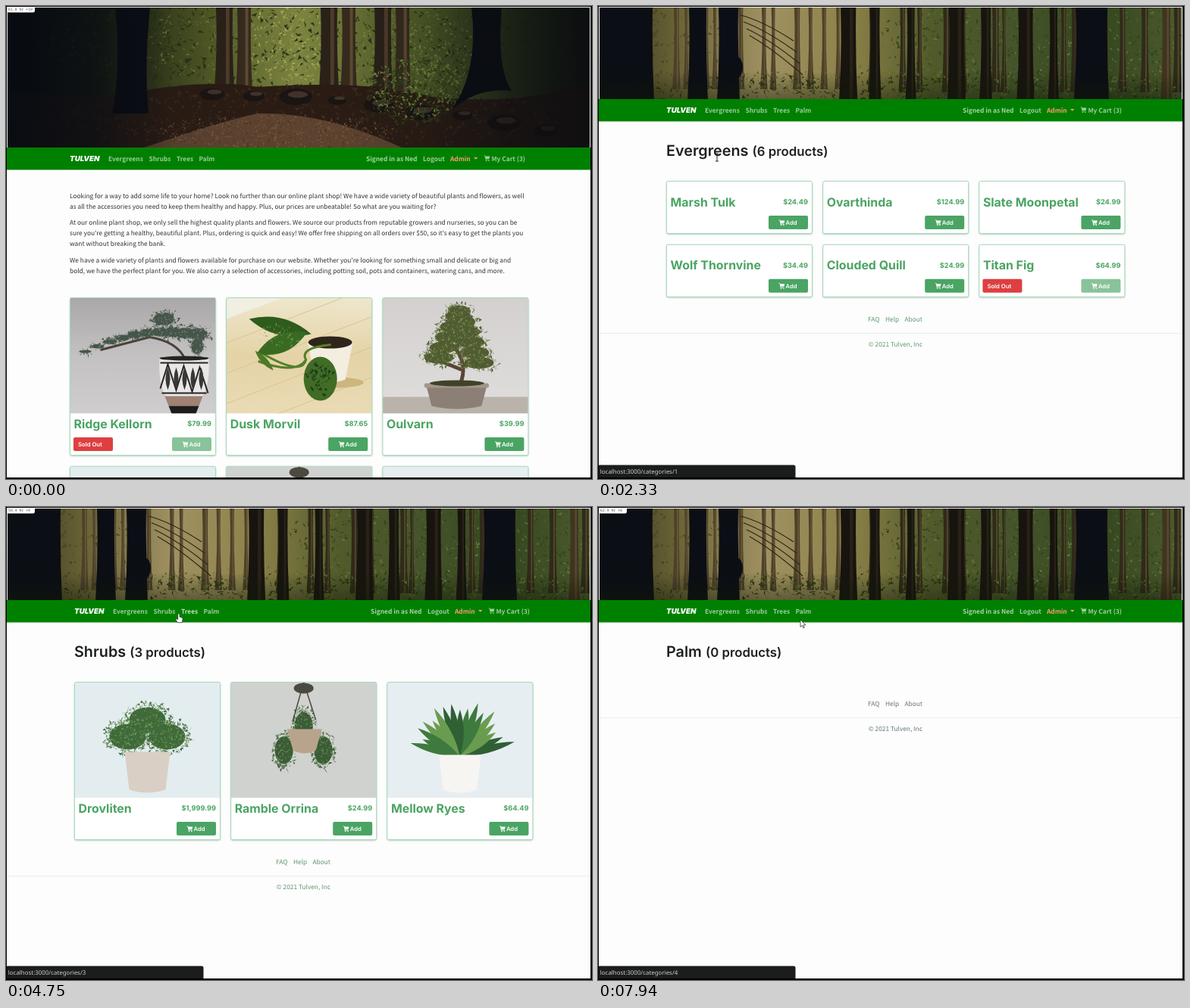
An HTML page for the animation above (8000 ms loop, 773 by 625 pixels).

```html
<!DOCTYPE html>
<html lang="en">
<meta charset="utf-8">
<title>Plant shop</title>
<style>
  html, body { margin: 0; height: 100%; overflow: hidden; background: #000; }
  #stage { display: block; width: 100vw; height: 100vh; }
  text { font: 8.35px "Noto Sans CJK JP", "Noto Sans CJK SC", "Noto Sans CJK", "Noto Sans", sans-serif; text-rendering: geometricPrecision; }
  .nav { font-weight: 700; }
  .geo { font-family: Inter, sans-serif; font-weight: 700; }
  .brand { font-size: 9.7px; font-weight: 900; font-style: italic; }
  .title { font-size: 19.8px; font-weight: 600; }
  .title tspan { font-size: 16.8px; }
  .name { font-size: 15.9px; }
  .price { font-size: 9.2px; text-anchor: end; }
  .btn { font-size: 7.7px; font-weight: 600; }
  .mid { text-anchor: middle; }
  .url { font: 7.9px "Noto Sans", "Open Sans", sans-serif; }
  .rate { font: 4.8px "DejaVu Sans Mono", monospace; }
  .card { filter: drop-shadow(0 1.2px 1px #3b8a5a90); }
</style>
<svg id="stage" viewBox="0 0 773 625">
  <clipPath id="view"><rect x="1" y="1" width="770" height="622"/></clipPath>
  <defs id="defs"></defs>
  <g clip-path="url(#view)">
    <g id="page"></g>
    <g id="status">
      <rect id="bar" y="606.5" height="20" rx="2.5" fill="#1b1c1c"/>
      <text id="url" class="url" x="2.8" y="617.5" fill="#d0d0d0"></text>
    </g>
    <path id="cursor" stroke="#222"/>
    <g id="badge">
      <rect x="1" y="0" width="37" height="8.5" rx="2.5" fill="#fff"/>
      <text id="rate" class="rate" x="3" y="6" fill="#555"></text>
    </g>
  </g>
</svg>
<script>
const $ = id => document.getElementById(id);
const clamp = v => Math.max(0, Math.min(1, v));
const times = (n, fn) => Array.from({length: n}, (_, i) => fn(i, n > 1 ? i / (n - 1) : 0)).join('');
const r1 = n => n.toFixed(1);
const {sin, cos, PI} = Math;
let seed = 7;
const rnd = (lo = 0, hi = 1) => lo + (hi - lo) * (seed = seed * 16807 % 2147483647) / 2147483647;

// ---- shape helpers
const rect = (x, y, w, h, fill, more = '') => `<rect x="${x}" y="${y}" width="${w}" height="${h}" fill="${fill}" ${more}/>`;
const oval = (x, y, rx, ry, fill) => `<ellipse cx="${x}" cy="${y}" rx="${rx}" ry="${ry}" fill="${fill}"/>`;
const path = (d, fill) => `<path d="${d}" fill="${fill}"/>`;
const line = (d, color, w, more = '') => `<path d="${d}" fill="none" stroke="${color}" stroke-width="${w}" ${more}/>`;
const text = (x, y, str, cls, fill) => `<text x="${x}" y="${y}" class="${cls}" fill="${fill}">${str}</text>`;
const grad = (id, across, ...stops) => `<linearGradient id="${id}" x2="${across}" y2="${1 - across}">` +
  stops.map((c, i) => `<stop offset="${i / (stops.length - 1)}" stop-color="${c}"/>`).join('') + '</linearGradient>';
const leaf = (x1, y1, x2, y2, w, fill) => {
  const len = Math.hypot(x2 - x1, y2 - y1), nx = (y1 - y2) / len * w, ny = (x2 - x1) / len * w;
  const mx = (x1 + x2) / 2, my = (y1 + y2) / 2;
  return path(`M${r1(x1)} ${r1(y1)}Q${r1(mx + nx)} ${r1(my + ny)} ${r1(x2)} ${r1(y2)}Q${r1(mx - nx)} ${r1(my - ny)} ${r1(x1)} ${r1(y1)}`, fill);
};
const fan = (x, y, n, r, spread, w, ...fills) => times(n, i => {
  const a = spread * (2 * (i * 3 % n) / (n - 1) - 1) * PI / 180, q = r * rnd(.75, 1.05);
  return leaf(x, y, x + q * sin(a), y - q * cos(a), w, fills[i % fills.length]);
});
const spray = (n, x, y, rx, ry, s, fill) => {
  const jit = () => r1(rnd(-s, s));
  return path(times(Math.round(n), () => {
    const a = rnd(0, 2 * PI), q = Math.sqrt(rnd());
    return `M${r1(x + rx * q * cos(a))} ${r1(y + ry * q * sin(a))}l${jit()} ${jit()}l${jit()} ${jit()}z`;
  }), fill);
};
const bush = (x, y, rx, ry, dark, light) =>
  oval(r1(x), r1(y), rx * .75, ry * .7, dark) + spray(rx * ry * .4, x, y, rx, ry, 4, dark) + spray(rx * ry * .25, x, y, rx, ry, 2.5, light);
const pot = (x, top, w, base, bottom, fill) => path(`M${x - w} ${top}H${x + w}L${x + base} ${bottom}Q${x} ${bottom + 8} ${x - base} ${bottom}Z`, fill);

// ---- header pictures
const night = '#0b0e14';
const trunk = (x, w, h, fill, lit) => path(`M${r1(x)} 0Q${r1(x + 2)} ${h / 2} ${r1(x - 2)} ${h}h${r1(w + 4)}Q${r1(x + w - 1)} ${h / 2} ${r1(x + w)} 0Z`, fill) +
  (lit ? line(`M${r1(x + w * .7)} 0V${h}`, lit, r1(w * .22)) : '');
const grove = (n, from, to, w, h, fill, lit) =>
  times(n, (i, k) => trunk(from + (to - from) * k + rnd(-9, 9), w * rnd(.6, 1.3), h, fill, lit));

const woods = rect(0, 0, 768, 121, 'url(#haze)') +
  spray(900, 600, 40, 230, 85, 5, '#34461d') + spray(500, 610, 50, 220, 75, 4, '#677737') + spray(200, 90, 60, 85, 70, 5, '#494722') +
  grove(12, 90, 310, 6, 108, '#4d412a', '#6b5a3a') + grove(14, 360, 750, 7, 112, '#2f2a1a', '#54482c') +
  times(4, i => line(`M${186 + i * 4} ${10 + i * 9}q30 ${8 + i * 3} 70 ${34 + i * 6}`, '#2b2516', 1.2)) +
  spray(500, 430, 108, 370, 24, 5, '#28370f') + spray(420, 450, 102, 340, 22, 4, '#5c6d2b') + spray(140, 320, 100, 110, 22, 3, '#7d7c3d') +
  grove(7, 318, 590, 16, 123, '#17140f', '#282116') + trunk(742, 11, 123, '#41351f', '#5a4a2d') +
  trunk(0, 70, 123, night) + trunk(118, 23, 123, night) + trunk(157, 26, 123, night) + oval(181, 79, 8, 14, night) + trunk(628, 42, 123, night) +
  rect(0, 85, 768, 36, 'url(#dusk)');

const glade = rect(0, 0, 768, 185, 'url(#glow)') +
  spray(900, 384, 50, 340, 65, 6, '#2a3417') + spray(420, 400, 50, 240, 60, 4, '#6a7534') +
  spray(260, 375, 50, 60, 55, 4, '#a3a556') + spray(300, 540, 75, 90, 65, 4, '#74833a') +
  [275, 413, 484].map(x => trunk(x, 22, 108, '#2a2118', '#4d3c29') + trunk(x + 28, 18, 112, '#352a1d', '#5d4932')).join('') +
  path('M0 110Q120 125 190 108Q280 95 330 105Q480 95 560 118Q680 130 768 100V185H0Z', '#2a1c14') +
  spray(700, 400, 145, 330, 40, 5, '#3d2a1d') + path('M180 185Q290 148 330 140Q420 138 520 185Z', '#5c422f') +
  spray(500, 355, 165, 160, 22, 3, '#7b5b42') + spray(400, 350, 166, 170, 22, 3, '#4a3425') +
  times(9, (i, k) => {
    const x = 270 + 440 * k, y = 115 + 50 * k * k + rnd(-4, 4), w = rnd(11, 22);
    return oval(r1(x), r1(y), r1(w), r1(w * .5), '#1a1412') + oval(r1(x + 3), r1(y - 3), r1(w * .6), r1(w * .2), '#40322a');
  }) +
  spray(400, 535, 110, 60, 45, 5, '#2f421a') + spray(300, 540, 105, 60, 42, 4, '#75883a') +
  path('M142 0H188Q180 80 186 140H138Q150 80 142 0Z', night) + path('M612 0H652Q645 80 665 110Q620 105 585 136Q622 85 612 0Z', night) +
  rect(0, 0, 768, 185, 'url(#edges)');

// ---- plant pictures, 192 x 153
const back = fill => rect(0, 0, 192, 153, fill);
const photos = [
  // leaning juniper in a patterned pot
  back('url(#grey)') + line('M152 82Q142 58 105 52L40 69', '#4a4138', 3) +
    times(10, (i, k) => bush(20 + 148 * k, 71 - 23 * k - 12 * sin(PI * k), 11 + 6 * k, 3 + 8 * k, '#455549', '#77877b')) +
    bush(124, 28, 18, 12, '#455549', '#77877b') + bush(168, 64, 11, 14, '#455549', '#77877b') +
    path('M118 80H183Q185 115 174 131H127Q116 115 118 80Z', '#e9e7e5') + oval(150.5, 80, 32.5, 3, '#262423') +
    line('M119 86H182M121 126H180M119 120' + 'l10-32l11 34'.repeat(3), '#262423', 2) +
    times(5, i => leaf(129 + i * 11, 92, 129 + i * 11, 122, 6, '#3a3735')) +
    path('M125 130H175L170 143H130Z', '#a08174') + path('M130 143H170L166 153H134Z', '#1d1b1b'),
  // trailing vine
  back('url(#cream)') + path('M0 0H75L0 28Z', '#f1eee2') + times(4, i => line(`M0 ${60 + i * 40}l192-75`, '#d8c493', 1)) +
    oval(145, 112, 36, 7, '#cdb57f') + pot(137, 58, 30, 20, 108, '#f4eee0') + oval(137, 59, 29, 8, '#30251a') +
    line('M138 62Q96 66 105 82Q100 104 48 74M105 82Q92 102 42 84', '#55802a', 3) +
    leaf(30, 28, 112, 48, 22, '#2e5c1d') + leaf(40, 74, 106, 46, 24, '#386a22') + spray(60, 72, 50, 28, 14, 3, '#7da04f') +
    leaf(38, 70, 62, 96, 8, '#4c7a28') + oval(124, 107, 22, 29, '#416c25') + spray(60, 124, 107, 16, 22, 5, '#18381a'),
  // bonsai
  back('url(#pale)') + rect(0, 131, 192, 22, '#b9b3ac') + line('M102 115Q112 90 98 70L102 30M104 95L72 82M104 92L130 80', '#5a4636', 5) +
    times(11, (i, k) => bush(101 + (i % 2 ? -30 : 26) * k, 18 + 68 * k, 20 + 6 * k, 11, '#4f5c31', '#86924f')) +
    pot(97.5, 116, 40, 33, 143, '#8c7f76') + rect(55, 113, 85, 6, '#a3968c', 'rx="2"') + oval(98, 113, 36, 4, '#3f4228'),
  // snake plant
  back('#cab6a2') + rect(0, 0, 62, 153, 'url(#veil)') +
    times(9, (i, k) => [9, 3].map((w, j) =>
      leaf(116 + 30 * k, 153, 80 + 82 * k, 8 + 65 * k * k + i % 2 * 30, w, j ? '#8a8459' : '#45432c')).join('')),
  // broad leaves on a stem
  back('#d1bda8') + times(5, i => line(`M${20 + i * 40} 0q${rnd(-8, 8)} 80 0 153`, '#c5ae97', 1)) + line('M95 140Q98 80 90 22', '#466032', 2.5) +
    times(13, i => {
      const side = i % 2 ? 1 : -1, y = 126 - 8 * i, far = side * (62 - 3.4 * i), tip = y - 18 + rnd(-6, 16);
      return line(`M94 ${y}L${94 + far * .5} ${r1(y - 6)}`, '#466032', 1.5) +
        leaf(94 + far * .35, y - 4, 94 + far, tip, 15, '#22422a') + leaf(94 + far * .5, y - 5, 94 + far * .9, tip, 4, '#42683e');
    }) + pot(100, 136, 34, 30, 153, '#b89a78') + line('M68 142H132M70 149H130', '#7c634b', 2, 'stroke-dasharray="4 2"'),
  // succulent in a turquoise pot
  back('#f1f1f2') + rect(0, 88, 192, 65, '#e4e5e6') + oval(105, 143, 45, 5, '#d2d5d5') +
    fan(95, 78, 17, 62, 68, 9, '#333b30', '#566450', '#454a3b') + fan(95, 78, 7, 40, 50, 8, '#64745a', '#3a4636') +
    pot(93, 74, 40, 31, 139, '#b5ece4') + rect(53, 73, 80, 7, '#c8f3ed'),
  // cactus
  back('url(#smoke)') + rect(130, 100, 62, 53, '#86705f') +
    [['#6f7969', 13], ['#9ea897', 8]].map(([c, w]) => line('M98 125Q92 70 95 14M99 95Q106 50 144 22M100 92Q118 72 136 66M95 82Q84 76 79 52', c, w, 'stroke-linecap="round"')).join('') +
    spray(110, 105, 62, 30, 50, 2.5, '#c3cabc') + path('M47 153Q46 122 60 119H114Q128 124 128 153Z', '#c9c7c3') + oval(87, 120, 28, 4, '#8e8a83'),
  // upright succulent
  back('#e3e3e2') + rect(0, 0, 192, 25, '#c6c6ca') + rect(0, 102, 192, 51, '#a4775a') +
    times(9, i => line(`M${76 + i * 5} 102L${i * 40 - 64} 153`, '#8a644d', 1)) +
    fan(96, 96, 11, 60, 42, 9, '#4a5650', '#738077', '#3c4842') + rect(73, 91, 47, 48, '#f6f6f5') + rect(113, 91, 7, 48, '#e0dfdd'),
  // fern
  back('#f0f0f1') + rect(0, 127, 192, 26, '#8b6c5b') +
    times(15, (i, k) => {
      const a = PI * (1.12 * k - .06), reach = rnd(65, 98);
      const d = `M100 104Q${r1(99 + 50 * cos(a))} ${r1(48 - 32 * sin(a))} ${r1(99 + reach * cos(a))} ${r1(92 - reach * .85 * sin(a))}`;
      return line(d, ['#3c8a2c', '#55a93a', '#2f7326'][i % 3], 8, 'stroke-dasharray="3 1.5"') + line(d, '#4a9a35', 3);
    }) + pot(100, 104, 26, 21, 148, '#efb2a6'),
  // round shrub, hanging basket, agave
  back('#e3edf0') + times(3, i => bush(70 + 26 * i, i % 2 ? 50 : 72, 32, 24, '#3f6a3a', '#7fa05c')) + pot(96, 92, 30, 24, 142, '#d9cfc4'),
  back('#d0d2cf') + line('M96 0L82 50M96 0L112 50', '#4c4a40', 1.5) + oval(96, 8, 13, 7, '#4c4a40') +
    times(3, i => bush(70 + 26 * i, i % 2 ? 58 : 90, 16, 26, '#3b5c37', '#76955a')) + pot(97, 62, 23, 15, 90, '#b8a48c'),
  back('#e6eef2') + fan(96, 98, 17, 72, 75, 10, '#3e7a3d', '#6a9c50', '#2f6034') + pot(96, 96, 28, 22, 142, '#f7f5f1')
];

$('defs').innerHTML =
  grad('haze', 1, '#33331a', '#6d6638', '#a09162', '#8d8149', '#505a2a', '#45542a', '#35461f', '#4c5a2e') +
  grad('glow', 1, '#10140f', '#1d2414', '#4c5423', '#7d8440', '#55602a', '#3a481e', '#151b10') +
  grad('dusk', 0, '#10180800', '#10180870') +
  grad('edges', 1, '#070b12f0', '#070b12b0', '#070b1210', '#070b1200', '#070b1200', '#070b1220', '#0a0c1090', '#0a0c10d0') +
  grad('grey', 0, '#a9a7a7', '#c3c1c1', '#cfcdcd') + grad('cream', 0, '#efe6cc', '#e4d3a6', '#eadbb5') + grad('veil', 1, '#f4f1ed', '#f0ece7', '#ddd3c8') +
  grad('pale', 0, '#d3d0cf', '#e0dedc') + grad('smoke', 1, '#666764', '#92938f', '#7f7c77') +
  photos.map((p, i) => `<symbol id="p${i}" viewBox="0 0 192 153">${p}</symbol>`).join('') +
  `<symbol id="woods" viewBox="0 0 768 121">${woods}</symbol><symbol id="glade" viewBox="0 0 768 185">${glade}</symbol>`;

// ---- shop content
const plants = [ // name, price, sold out
  ['Ridge Kellorn', '$79.99', 1], ['Dusk Morvil', '$87.65'], ['Oulvarn', '$39.99'],
  ['Marsh Tulk', '$24.49'], ['Ovarthinda', '$124.99'], ['Slate Moonpetal', '$24.99'],
  ['Wolf Thornvine', '$34.49'], ['Clouded Quill', '$24.99'], ['Titan Fig', '$64.99', 1],
  ['Drovliten', '$1,999.99'], ['Ramble Orrina', '$24.99'], ['Mellow Ryes', '$64.49']
];
const pages = [ // badge: when the rate badge is fully visible
  {at: 0, ids: [0, 1, 2, 9, 10, 11], badge: 0, rate: '61.8 Hz +10'},
  {at: 2120, title: 'Evergreens', ids: [3, 4, 5, 6, 7, 8], badge: 2870, rate: '50.2 Hz +12', foot: '#5b9a6c'},
  {at: 3780, title: 'Shrubs', ids: [9, 10, 11], badge: 4540, rate: '58.4 Hz +9', foot: '#5f9470'},
  {at: 5090, title: 'Trees', ids: [0, 1, 2], badge: 5840, rate: '90.0 Hz +11', foot: '#6c7a74'},
  {at: 7010, title: 'Palm', ids: [], badge: 7530, rate: '62.9 Hz +8', foot: '#62747e'}
];
const intro = [
  ['Looking for a way to add some life to your home? Look no further than our online plant shop! We have a wide variety of beautiful plants and flowers, as well',
    'as all the accessories you need to keep them healthy and happy. Plus, our prices are unbeatable! So what are you waiting for?'],
  ['At our online plant shop, we only sell the highest quality plants and flowers. We source our products from reputable growers and nurseries, so you can be',
    "sure you're getting a healthy, beautiful plant. Plus, ordering is quick and easy! We offer free shipping on all orders over $50, so it's easy to get the plants you",
    'want without breaking the bank.'],
  ["We have a wide variety of plants and flowers available for purchase on our website. Whether you're looking for something small and delicate or big and",
    'bold, we have the perfect plant for you. We also carry a selection of accessories, including potting soil, pots and containers, watering cans, and more.']
];
const links = [[51, 'Evergreens'], [104.5, 'Shrubs'], [141, 'Trees'], [170.5, 'Palm']];

const cart = (x, y, fill) => `<g transform="translate(${x} ${y})">` +
  path('M0 0H1.7L2 1H7.8L7 4.4H2.8L3 5.2H7V6H2.2L1.1 .8H0Z', fill) + oval(3, 7, .8, .8, fill) + oval(6.4, 7, .8, .8, fill) + '</g>';

const button = (x, y, label, dx, fill) => rect(x, y, 52, 18, fill, 'rx="2"') + text(x + dx, y + 12, label, 'geo btn', '#fff');

const card = (x, y, h, id, loaded) => {
  const [name, price, sold] = plants[id], end = y + (loaded ? 208 : 69), top = end - 23.5;
  return rect(x, y, 192, h, '#fff', 'rx="2" class="card"') +
    (loaded ? `<use href="#p${id}" x="${x}" y="${y}" width="192" height="153"/>` : '') +
    rect(x, y, 192, h, 'none', 'rx="2" stroke="#a8d9ba"') +
    text(x + 5, end - 36, name, 'geo name', '#4aa463') + text(x + 186.5, end - 38.2, price, 'geo price', '#4aa463') +
    (sold ? button(x + 4.5, top, 'Sold Out', 6, '#de3f40') : '') +
    `<g opacity="${sold ? .65 : 1}">` + button(x + 134.5, top, 'Add', 22.5, '#4aa463') + cart(x + 148, top + 5.4, '#fff') + '</g>';
};

function introText(x) {
  let y = 246, out = '';
  for (const lines of intro) {
    y -= 6.5;
    for (const s of lines) out += text(x, y += 14, s, '', '#333');
    y += 14.3;
  }
  return out;
}

function drawPage(page, loaded, hover) {
  const home = !page.title, hero = home ? 187 : 123, rows = [];
  let y = home ? 385.5 : 231.5;
  for (let i = 0; i < page.ids.length; i += 3) {
    const h = loaded > i ? 208 : 69;
    rows.push({i, y, h});
    y += h + 14.8;
  }
  const rule = Math.max(y - 15, 230) + 48, x = rule > 582 ? 84 : 90; // a scrollbar narrows the page
  const base = hero + 17.6, dim = '#ffffff9c', pink = '#f79b78';
  let out = rect(0, 0, 773, 625, '#fdfdfd') +
    `<use href="#${home ? 'glade' : 'woods'}" x="2" y="2" width="768" height="${hero - 2}"/>` + rect(0, hero, 773, 29.5, '#008000') +
    text(x, base, 'TULVEN', 'geo brand', '#fff') +
    links.map(([dx, s], i) => text(x + dx, base, s, 'nav', i === hover ? '#ffffffbf' : dim)).join('') +
    text(x + 391, base, 'Signed in as Ned', 'nav', '#ffffffa8') + text(x + 466, base, 'Logout', 'nav', dim) +
    text(x + 502, base, 'Admin', 'nav', pink) + path(`M${x + 533} ${hero + 13}h5.4l-2.7 2.8z`, pink) +
    cart(x + 546.5, hero + 10.5, dim) + text(x + 556.5, base, 'My Cart (3)', 'nav', dim);
  for (const {i, y, h} of rows)
    for (let k = i; k < i + 3; k++) out += card(+r1(x + .5 + (k - i) * 206.2), y, h, page.ids[k], k < loaded);
  if (home) return out + introText(x);
  return out + text(x, 198, `${page.title} <tspan>(${page.ids.length} products)</tspan>`, 'geo title', '#1c211c') +
    rect(0, rule, 773, 1, '#ececec') +
    [[266, 'FAQ'], [289, 'Help'], [314.5, 'About']].map(([dx, s]) => text(x + dx, rule - 15.5, s, '', page.foot)).join('') +
    text(x + 302.3, rule + 18, '© 2021 Tulven, Inc', 'mid', page.foot);
}

// ---- pointer and status bar
const glides = [ // start, end, x, y
  [0, 1, 724, 624], [260, 950, 136, 181], [950, 1200, 157, 200], [2940, 3270, 202, 145], [3450, 3710, 199, 140],
  [4610, 4820, 238, 141], [5150, 5560, 288, 184], [6180, 6800, 270, 140], [7730, 7930, 267, 149]
];
const hints = [[1100, 3010], [3600, 4720], [4720, 6040], [6740, 8140]];
const shapes = {
  arrow: 'M0 0V9.5L2.3 7.4 3.9 11 5.3 10.3 3.8 6.9H7Z',
  hand: 'M-1.2 1Q0-1 1.2 1V4.6L4.2 5.4Q5.4 6 5.2 8L4.2 12H-1.6L-4.2 7.8Q-3.6 6-1.2 8Z',
  beam: 'M-2-5H2M0-5V5M-2 5H2'
};

const pointer = t => glides.reduce(([px, py], [a, b, x, y]) => {
  const k = clamp((t - a) / (b - a)), e = k * k * (3 - 2 * k);
  return [px + (x - px) * e, py + (y - py) * e];
}, [724, 624]);

let start, shown;
function tick(now) {
  start ??= now;
  const t = (now - start) % 8000, page = pages.findLast(p => p.at <= t), n = page.ids.length;
  const [x, y] = pointer(t), navY = page.title ? 138 : 201;
  const loaded = page.title ? page.ids.filter((_, i) => t >= page.at + 500 + 250 * i / n).length : n;
  const hover = Math.abs(y - navY) < 9 && x > 134 && x < 282 ? links.findLastIndex(l => l[0] + 84 <= x) : -1;
  const key = [page.at, loaded, hover].join();
  if (key !== shown) {
    $('page').innerHTML = drawPage(page, loaded, hover);
    $('rate').textContent = page.rate;
    shown = key;
  }
  $('badge').setAttribute('opacity', page.badge ? clamp((t - page.badge + 280) / 280) : 1);

  const h = hints.findIndex(([a, b]) => t >= a && t < b), [a, b] = hints[h] ?? [t, t];
  const fadeIn = h === 2 ? 1 : (t - a) / 140, fadeOut = h === 1 ? 1 : (b - t) / 140;
  $('status').setAttribute('opacity', clamp(Math.min(fadeIn, fadeOut)));
  $('url').textContent = 'localhost:3000/categories/' + (h + 1);
  $('bar').setAttribute('width', 160 + 100.5 * clamp((t - 1570) / 140));

  const kind = hover >= 0 ? 'hand' : page.title && y > 184.5 && y < 206 && x < 250 ? 'beam' : 'arrow', c = $('cursor');
  c.setAttribute('d', shapes[kind]);
  c.setAttribute('transform', `translate(${r1(x)} ${r1(y)})`);
  c.setAttribute('fill', kind === 'beam' ? 'none' : '#fff');
  c.setAttribute('stroke-width', kind === 'beam' ? 1 : .7);
  requestAnimationFrame(tick);
}
requestAnimationFrame(tick);
</script>
</html>
```
